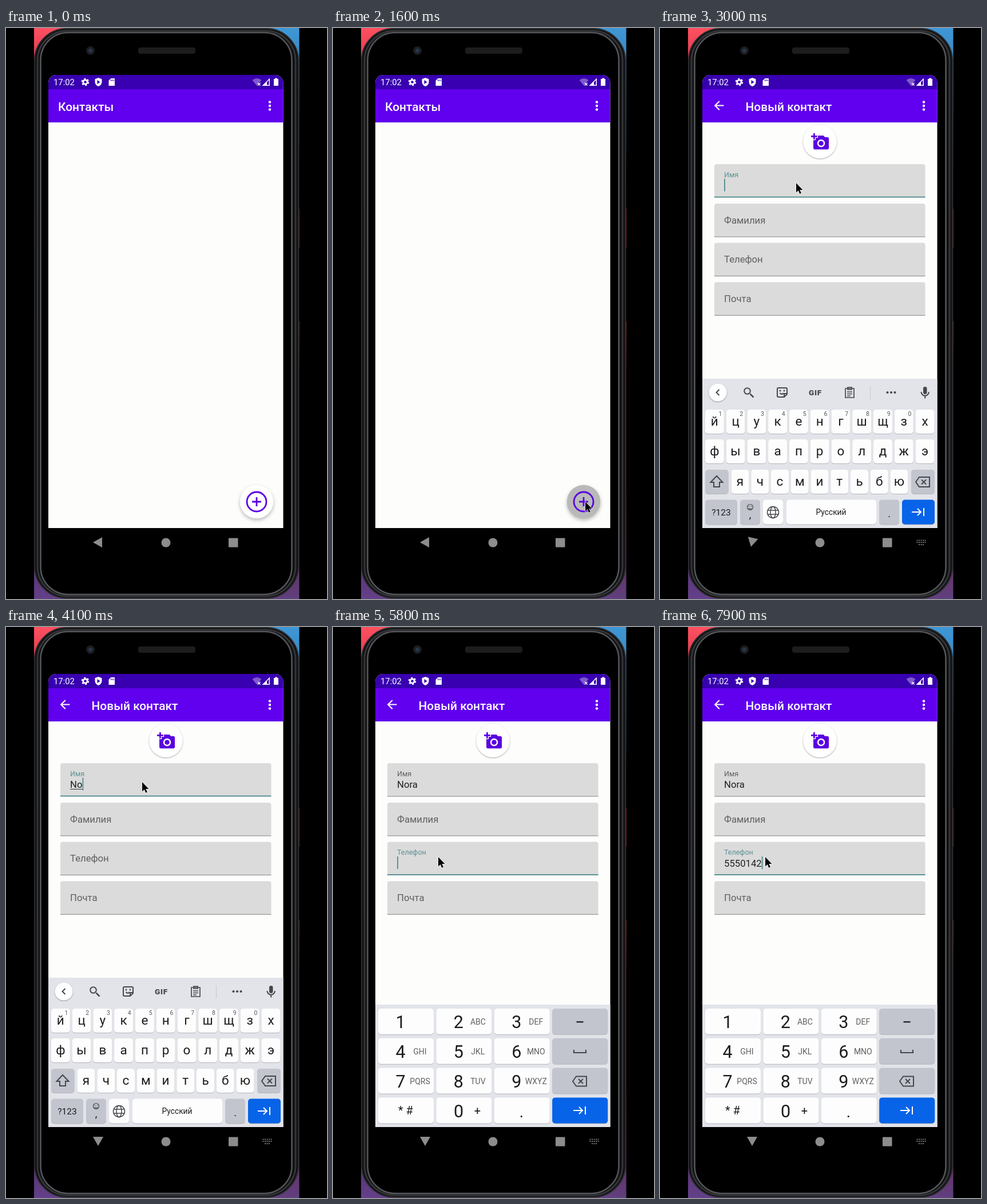
An HTML page for the animation above (8000 ms loop, 561 px wide and 998 px high).

```html
<!DOCTYPE html>
<html lang="ru">
<head>
<meta charset="utf-8">
<title>Контакты</title>
<style>
  html, body { margin: 0; width: 100%; height: 100%; overflow: hidden; background: #000; }
  svg { display: block; width: 561px; height: 998px; font-family: Roboto, "Noto Sans", sans-serif; }
  .mid { text-anchor: middle; }
  .title { font-size: 20.9px; font-weight: 500; fill: #fff; }
  .soft { filter: drop-shadow(0 1px 1px #0005); }
  .fab { filter: drop-shadow(0 3px 3px #0004); }
  .line { fill: none; stroke: #44474b; stroke-width: 2; }
</style>
</head>
<body>
<svg viewBox="0 0 561 998">
  <defs>
    <linearGradient id="left" x2="0" y2="1">
      <stop offset="0" stop-color="#ff5060"/><stop offset=".06" stop-color="#d83a50"/>
      <stop offset=".1" stop-color="#181418"/><stop offset=".7" stop-color="#181418"/>
      <stop offset=".72" stop-color="#7a1238"/><stop offset=".76" stop-color="#3a1830"/>
      <stop offset=".93" stop-color="#54306c"/><stop offset="1" stop-color="#64408a"/>
    </linearGradient>
    <linearGradient id="right" x2="0" y2="1">
      <stop offset="0" stop-color="#3f97d6"/><stop offset=".08" stop-color="#3a7fb8"/>
      <stop offset=".25" stop-color="#15202c"/><stop offset=".316" stop-color="#15161c"/>
      <stop offset=".317" stop-color="#c8404a"/><stop offset=".384" stop-color="#c8404a"/>
      <stop offset=".385" stop-color="#12141e"/><stop offset=".513" stop-color="#12141e"/>
      <stop offset=".514" stop-color="#d0503c"/><stop offset=".56" stop-color="#a02c38"/>
      <stop offset=".6" stop-color="#74122c"/><stop offset=".85" stop-color="#681a3c"/>
      <stop offset="1" stop-color="#60407e"/>
    </linearGradient>
    <clipPath id="screen"><path d="M74 874V96a14 14 0 0 1 14-14H470.500a14 14 0 0 1 14 14V874Z"/></clipPath>
    <clipPath id="shot"><rect x="49" width="463.500" height="998"/></clipPath>
  </defs>

  <rect x="49" width="232" height="998" fill="url(#left)"/>
  <rect x="281" width="231.500" height="998" fill="url(#right)"/>
  <rect x="508" y="250" width="4.500" height="66" rx="1" fill="#111"/>
  <rect x="50" y="1" width="461" height="995.500" rx="56" fill="#101011" stroke="#2b2c2e" stroke-width="2"/>
  <rect x="55" y="5" width="451" height="988" rx="52" fill="none" stroke="#333538" stroke-width="3"/>
  <rect x="60.500" y="8" width="439" height="982" rx="48" fill="#000" stroke="#55575b" stroke-width="2.500"/>
  <rect x="64" y="11" width="433" height="976" rx="45"/>
  <circle cx="147.500" cy="39.500" r="7.500" fill="#1b1d20"/>
  <circle cx="147.500" cy="39.500" r="3.500" fill="#27384c"/>
  <rect x="231" y="34" width="100" height="11" rx="4" fill="#1d1d1e"/>

  <g clip-path="url(#screen)">
    <rect x="74" y="82" width="411" height="792" fill="#fdfdfc"/>
    <g id="list"></g>
    <g id="form"></g>
    <g id="bar"></g>
    <g id="letters"></g>
    <g id="numbers"></g>
  </g>

  <g fill="#8d8d8d">
    <path id="back" d="M152 899L168 890V908Z"/>
    <circle cx="279.500" cy="899.500" r="8"/>
    <rect x="389" y="891.500" width="16.500" height="16" rx="1"/>
    <path id="toggle" d="M448.500 895.500h16M448.500 899h16M452 903h9" fill="none" stroke="#777" stroke-width="2" stroke-dasharray="2 1.500"/>
  </g>
  <g clip-path="url(#shot)">
    <path id="cursor" d="M0 0V16.500L3.700 13 6.200 18.800 8.800 17.700 6.400 12H11.500Z" stroke="#fff" stroke-width="1.200" paint-order="stroke"/>
  </g>
</svg>
<script>
const $ = id => document.getElementById(id);
const PURPLE = '#5a00e0', TEAL = '#5c9295', GREY = '#606062';
const NAME = 'Nora', PHONE = '5550142';
const NAME_TIMES = [3600, 4000, 4400, 4700];
const PHONE_TIMES = [...PHONE].map((_, i) => 6100 + 250 * i);

const text = (x, y, s, size, fill = '#1c1c1e', extra = 'class="mid"') =>
  `<text x="${x}" y="${y}" font-size="${size}" fill="${fill}" ${extra}>${s}</text>`;
const box = (x, y, w, h, fill, r = 5) =>
  `<rect x="${x}" y="${y}" width="${w}" height="${h}" rx="${r}" fill="${fill}"/>`;
const key = (x, y, w, h, fill = '#fdfdfd') => box(x, y + 1, w, h, '#b4b6bc') + box(x, y, w, h, fill);
const line = (d, extra = '') => `<path class="line" d="${d}" ${extra}/>`;
const dots = (points, r, fill) => points.map(([x, y]) => `<circle cx="${x}" cy="${y}" r="${r}" fill="${fill}"/>`).join('');
const erase = (x, y) => line(`M${x - 12} ${y}l6-8.500h18v17h-18zM${x - 2} ${y - 4}l8 8m0-8l-8 8`);
const next = (x, y) => line(`M${x - 11} ${y}h16m-6-6l6 6-6 6M${x + 10} ${y - 7}v14`, 'style="stroke:#fff"');

$('list').innerHTML = `<circle id="add" class="fab" cx="438" cy="828" r="29.200"/>
  <g fill="none" stroke="${PURPLE}" stroke-width="2.800"><circle cx="438" cy="828" r="17"/><path d="M430 828h16M438 820v16"/></g>`;

const fieldTops = [238, 307, 375.5, 444.3];
$('form').innerHTML = `<circle class="soft" cx="279.500" cy="198.500" r="29.500" fill="#fff"/>
  <path transform="translate(264 182.600) scale(1.350)" fill="${PURPLE}" fill-rule="evenodd" d="M3 4V1h2v3h3v2H5v3H3V6H0V4zm3 6V7h3V4h7l1.830 2H21a2 2 0 0 1 2 2v12a2 2 0 0 1-2 2H5a2 2 0 0 1-2-2V10zm7 9a5 5 0 0 0 0-10 5 5 0 0 0 0 10zm0-1.800a3.200 3.200 0 0 1 0-6.400 3.200 3.200 0 0 1 0 6.400z"/>` +
  ['Имя', 'Фамилия', 'Телефон', 'Почта'].map((label, i) => {
    const y = fieldTops[i];
    return `<path d="M95 ${y + 58}v-54a4 4 0 0 1 4-4h360.500a4 4 0 0 1 4 4v54z" fill="#dbdbdb"/>
      <rect id="rule${i}" x="95" width="368.500"/>
      <text id="label${i}" x="112">${label}</text>` + text(112, y + 43, '', 16.7, '#1f1f1f', `id="value${i}"`);
  }).join('') +
  '<rect id="caret" width="2" height="22"/><rect id="under" x="112" y="283" height="1" fill="#333"/>' +
  `<g class="soft">${box(213, 803, 133, 50, TEAL, 8)}</g>` +
  text(280, 834, 'СОХРАНИТЬ', 14.6, '#fff', 'class="mid" font-weight="500" letter-spacing="1.300"');

$('bar').innerHTML = box(74, 107, 411, 58, '#6000ee', 0) + box(74, 82, 411, 25, '#3800b0', 0) +
  text(83, 100, '17:02', 14.8, '#fff', '') +
  `<g fill="none" stroke="#fff"><circle cx="138.500" cy="94.500" r="3.700" stroke-width="2.800"/>
    <circle cx="138.500" cy="94.500" r="5.700" stroke-width="2.200" stroke-dasharray="3 2.970"/></g>
  <path fill="#fff" d="M161.500 87l6 2.300v4.700c0 3.800-2.500 7-6 8-3.500-1-6-4.200-6-8v-4.700z"/>
  <path fill="#3800b0" d="M159.500 91v7l5-3.500z"/>
  <path fill="#fff" d="M183.500 88h6.500v13h-10.500v-9z"/>
  <path stroke="#3800b0" d="M183.500 90v3m2.300-3v3m2.300-3v3"/>
  <path fill="#fff" opacity=".35" d="M430.500 91q8-6 16 0l-8 10z"/>
  <path stroke="#fff" stroke-width="1.400" d="M440 96l4.500 4.500m0-4.500l-4.500 4.500"/>
  <path fill="#fff" d="M447.500 101L461 87.500V101zM470.500 87.500h3.500v1.500h2v12h-8v-12h2.500z"/>
  <path fill="#3800b0" d="M456 94.500l3.500-3.500v8.500h-3.500z"/>` +
  dots([[461, 129.500], [461, 136], [461, 142.500]], 2.2, '#fff') +
  `<text id="title" class="title" y="144.500"></text>
  <path id="up" fill="#fff" transform="translate(90.500 123) scale(1.045)" d="M20 11H7.830l5.590-5.590L12 4l-8 8 8 8 1.410-1.410L7.830 13H20z"/>`;

const SPECIAL = '#c3c5ce', BOARD = '#e2e4ea', BLUE = '#0763e8';
const rowOf = (chars, x, y, step, w) => [...chars].map((c, i) =>
  key(x + i * step - w / 2, y, w, 42) + text(x + i * step, y + 28, c, 22.5)).join('');

$('letters').innerHTML = box(74, 613, 411, 262, BOARD, 0) +
  `<circle class="soft" cx="101" cy="637" r="15.500" fill="#fff"/>` +
  line('M103.500 632l-5 5 5 5') +
  line('M157.500 639.500l6 6', 'style="stroke-width:2.500"') + '<circle class="line" cx="152.500" cy="634.500" r="5.300"/>' +
  line('M207 629h13a2 2 0 0 1 2 2v9l-5 5h-10a2 2 0 0 1-2-2v-12a2 2 0 0 1 2-2zM222 639h-5v6M209.500 638q4 4 6 0') +
  dots([[210, 634], [217, 634]], 1.4, '#44474b') +
  text(271.5, 641.5, 'GIF', 13.5, '#44474b', 'class="mid" font-weight="900" letter-spacing=".8"') +
  line('M324 630h15v16h-15zM328 630v-2h7v4h-7zM327 636h9m-9 3.500h9m-9 3.500h6', 'style="stroke-width:1.700"') +
  box(367, 626, 1, 23, '#c6c8ce', 0) +
  dots([[397.500, 637], [404, 637], [410.500, 637]], 2.1, '#44474b') +
  box(460, 627, 6.500, 13, '#44474b', 3.2) + line('M456.500 636a6.700 6.700 0 0 0 13.400 0M463.200 643v4.500') +
  rowOf('йцукенгшщзх', 95.3, 667, 36.77, 33) +
  [...'1234567890'].map((c, i) => text(105.5 + i * 36.77, 678, c, 10.5, '#55585c')).join('') +
  rowOf('фывапролджэ', 95.3, 719, 36.77, 33) +
  rowOf('ячсмитьбю', 140, 772, 34.75, 31) +
  key(79, 772, 40.500, 42, SPECIAL) + line('M99 783l-10.500 11h5.500v8h10v-8h5.500z') +
  key(439, 772, 41, 42, SPECIAL) + erase(459, 793.5) +
  key(79, 824.5, 56, 43, SPECIAL) + text(107, 852, '?123', 15.5) +
  key(140, 824.5, 35, 43, SPECIAL) + text(157.5, 857, ',', 18) +
  '<circle class="line" cx="157.500" cy="837.500" r="5" style="stroke-width:1.200"/>' +
  line('M154.800 839.500q2.700 2.500 5.400 0', 'style="stroke-width:1.200"') + dots([[155.700, 836], [159.300, 836]], .8, '#44474b') +
  key(180, 824.5, 35, 43) +
  '<g class="line" style="stroke-width:1.500"><circle cx="197.500" cy="846.500" r="10"/><ellipse cx="197.500" cy="846.500" rx="4.500" ry="10"/><path d="M188.500 843h18m-18 7h18"/></g>' +
  key(221, 824.5, 157, 43) + text(299, 851, 'Русский', 13.8) +
  key(383, 824.5, 35, 43, SPECIAL) + text(400.5, 855, '.', 18) +
  key(423, 824.5, 57, 43, BLUE) + next(451, 846);

const pads = ['', 'ABC', 'DEF', 'GHI', 'JKL', 'MNO', 'PQRS', 'TUV', 'WXYZ'];
const padX = c => 79 + 101.4 * c, padY = r => 667 + 51.8 * r;
$('numbers').innerHTML = box(74, 660, 411, 215, BOARD, 0) +
  Array.from({ length: 16 }, (_, i) => {
    const c = i % 4, r = i >> 2;
    return key(padX(c), padY(r), 97, 45, c < 3 ? '#fdfdfd' : r < 3 ? SPECIAL : BLUE);
  }).join('') +
  pads.map((s, i) => {
    const x = padX(i % 3), y = padY(Math.floor(i / 3));
    return text(x + 39, y + 34, i + 1, 30.5) + text(x + 73, y + 28, s, 14, GREY);
  }).join('') +
  text(127, 852, '* #', 20) + text(219.5, 856.5, '0', 30.5) + text(252.5, 852, '+', 20) + text(329.5, 856.5, '.', 28) +
  box(425.5, 689, 12, 2.5, '#2a2a2c', 0) + line('M421 739v5h21v-5', 'style="stroke-width:2.200"') +
  erase(431, 794) + next(431, 845);

const clamp = v => Math.max(0, Math.min(1, v));
const ease = (t, from, to) => { const p = clamp((t - from) / (to - from)); return p * p * (3 - 2 * p); };
const set = (id, attrs) => { for (const k in attrs) $(id).setAttribute(k, attrs[k]); };
const show = (id, on) => { $(id).style.display = on ? '' : 'none'; };
const typed = (times, t) => times.filter(s => s <= t).length;

// time, x, y of the pointer tip
const path = [[600, 516, 700], [1300, 441, 828], [1800, 441, 828], [2300, 241, 309], [2500, 238, 271],
  [4900, 238, 271], [5300, 184, 402], [8000, 184, 402]];
function pointer(t) {
  const i = Math.max(1, path.findIndex(p => p[0] > t));
  const [a, b] = [path[i - 1], path[i]], p = ease(t, a[0], b[0]);
  return [a[1] + (b[1] - a[1]) * p, a[2] + (b[2] - a[2]) * p];
}

function drawField(i, t, focused, start, value) {
  const lift = ease(t, start, start + 200), y = fieldTops[i];
  set('label' + i, { y: y + 34.5 - 12 * lift, 'font-size': 16.7 - 4.2 * lift, fill: focused ? TEAL : GREY });
  set('rule' + i, { y: y + (focused ? 56.5 : 57.5), height: focused ? 2 : 1, fill: focused ? TEAL : '#858587' });
  $('value' + i).textContent = value;
}

function draw(t) {
  const isForm = t >= 1800, focus = t >= 5500 ? 2 : t >= 2700 ? 0 : -1;
  const name = NAME.slice(0, typed(NAME_TIMES, t)), phone = PHONE.slice(0, typed(PHONE_TIMES, t));
  show('list', !isForm); show('form', isForm); show('up', isForm);
  $('title').textContent = isForm ? 'Новый контакт' : 'Контакты';
  set('title', { x: isForm ? 149.5 : 91 });
  set('add', { fill: t >= 1500 ? '#b9b9b9' : '#fff' });

  const starts = [2700, 9000, 5500, 9000];
  starts.forEach((s, i) => drawField(i, t, focus === i, s, [name, '', phone, ''][i]));
  const last = Math.max(...[2700, 5500, ...NAME_TIMES, ...PHONE_TIMES].filter(s => s <= t), 0);
  const blink = focus >= 0 && (t - last) % 1000 < 500;
  show('caret', blink);
  if (blink) {
    const w = $('value' + focus).getComputedTextLength();
    set('caret', { x: 112 + w, y: fieldTops[focus] + 25.5, fill: TEAL });
  }
  const composing = focus === 0 && name;
  show('under', composing);
  if (composing) set('under', { width: $('value0').getComputedTextLength() });

  show('letters', t >= 2700 && t < 5600); show('numbers', t >= 5600);
  set('letters', { transform: `translate(0 ${262 * (1 - ease(t, 2700, 2950))})` });
  set('back', { transform: `translate(0 ${-ease(t, 2750, 3050)}) rotate(${-90 * ease(t, 2750, 3080)} 161 899)` });
  show('toggle', t >= 2800);
  show('cursor', t >= 600);
  set('cursor', { transform: `translate(${pointer(t)})` });
}

function tick(now) {
  draw(Math.floor(now % 8000 / 100) * 100);
  requestAnimationFrame(tick);
}
draw(0);
requestAnimationFrame(tick);
</script>
</body>
</html>
```
